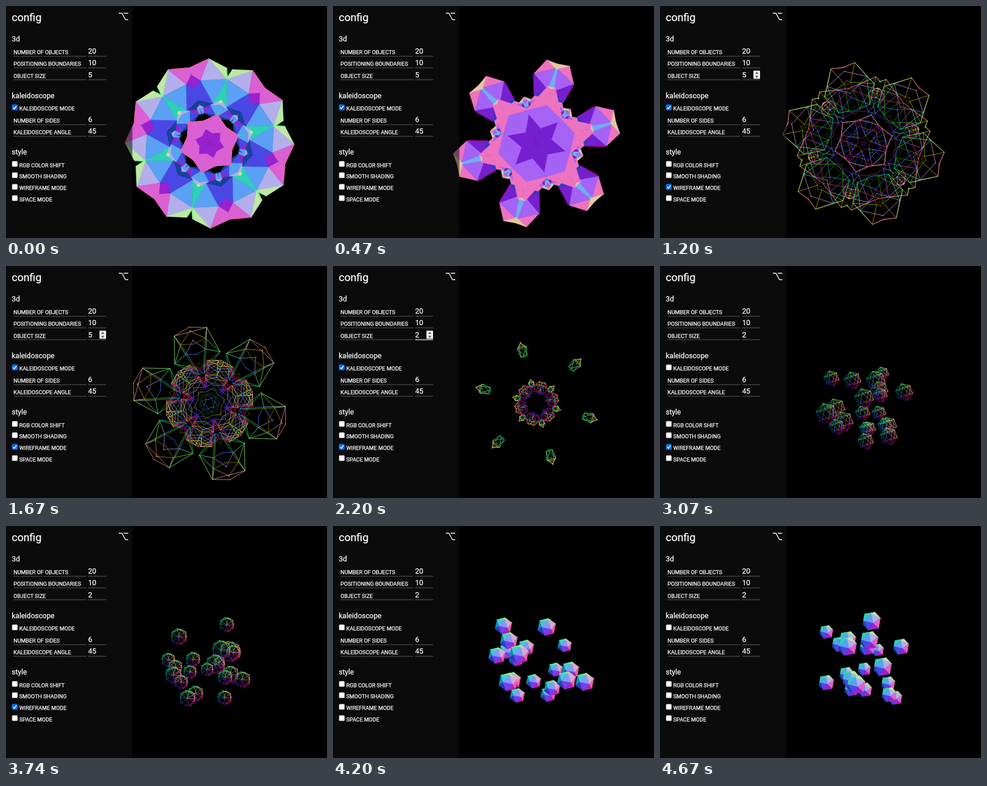
Animation, 555 px wide and 400 px high, one loop 4730 ms. Source, as an HTML page with a canvas:

```html
<!DOCTYPE html>
<html lang="en">
<head>
<meta charset="utf-8">
<title>config</title>
<style>
html, body { margin: 0; width: 100%; height: 100%; overflow: hidden; background: #000; }
canvas, svg { position: absolute; left: 0; top: 0; width: 555px; height: 400px; }
text { font-family: Roboto, Arial, sans-serif; font-size: 9.45px; fill: #fff; stroke: #fff; stroke-width: .25px; }
.title { font-size: 18.6px; }
.head, .value { font-size: 12.5px; }
.line { stroke: #484848; stroke-width: 1.4; }
.line.focus { stroke: #ddd; }
.box { fill: #fff; stroke: #767676; stroke-width: .7; }
.tick { fill: none; stroke: #fff; stroke-width: 1.5; visibility: hidden; }
.on .box { fill: #0b6df0; stroke: #0b6df0; }
.on .tick { visibility: visible; }
</style>
</head>
<body>
<canvas id="stage" width="555" height="400"></canvas>
<svg id="panel" viewBox="0 0 555 400">
  <rect width="218.5" height="400" fill="#141414" fill-opacity=".55"/>
  <text class="title" x="10" y="25.5">config</text>
  <path d="M195 12.5h5.5l6 11h4.8M203.5 12.5h7.8" fill="none" stroke="#fff" stroke-width="1.3"/>
  <text class="head" x="10" y="60.5">3d</text>
  <text class="head" x="10" y="159">kaleidoscope</text>
  <text class="head" x="10" y="256">style</text>
</svg>
<script>
const RAD = Math.PI / 180;
const LOOP = 4730, FRAMES = 71, STEP = 1 / 15;
const CX = 352, CY = 237;
// moments in seconds
const WIRE_ON = .9, HOVER = 1.14, FOCUS = 1.7, LEAVE = 2.6, KALEIDO_OFF = 2.88, WIRE_OFF = 4.2, END = 4.667;

const panel = document.getElementById('panel');
const ctx = document.getElementById('stage').getContext('2d');

// ---- config panel ----
function add(markup) {
  const g = document.createElementNS('http://www.w3.org/2000/svg', 'g');
  g.innerHTML = markup;
  return panel.appendChild(g);
}
function field(label, value, y) {
  return add(`<text x="13" y="${y}">${label}</text><text class="value" x="142" y="${y - 1}">${value}</text>
    <path class="line" d="M13 ${y + 3.6}H139"/><path class="line edge" d="M142 ${y + 3.6}H173"/>`);
}
function checkbox(label, y) {
  return add(`<rect class="box" x="10.5" y="${y - 10}" width="9.5" height="9.5" rx="1.6"/>
    <path class="tick" d="M12.5 ${y - 5}l2 2.2 3.6-4.8"/><text x="23" y="${y}">${label}</text>`);
}
field('NUMBER OF OBJECTS', 20, 83);
field('POSITIONING BOUNDARIES', 10, 103);
const sizeField = field('OBJECT SIZE', 5, 123.5);
const kaleidoBox = checkbox('KALEIDOSCOPE MODE', 180);
field('NUMBER OF SIDES', 6, 201);
field('KALEIDOSCOPE ANGLE', 45, 221);
checkbox('RGB COLOR SHIFT', 277.5);
checkbox('SMOOTH SHADING', 297);
const wireBox = checkbox('WIREFRAME MODE', 317);
checkbox('SPACE MODE', 336.5);
const spinner = add(`<rect x="161.5" y="111.5" width="11.5" height="14" rx="1" fill="#eee"/>
  <path d="M164.5 117l2.8-3.4 2.8 3.4zM164.5 120.5l2.8 3.4 2.8-3.4z" fill="#555"/>`);
const sizeText = sizeField.querySelector('.value');
const sizeEdge = sizeField.querySelector('.edge');

// ---- 3d ----
const turn = (a, b, t) => [a * Math.cos(t) - b * Math.sin(t), a * Math.sin(t) + b * Math.cos(t)];
function rotate([x, y, z], ax, ay, az) {
  [z, x] = turn(z, x, ay);
  [y, z] = turn(y, z, ax);
  [x, y] = turn(x, y, az);
  return [x, y, z];
}
const spin = (v, t) => rotate(v, .86 * t, 1.5 * t, -.75 * t);

// icosahedron: two poles and two rings of five, tilted
const verts = [[0, 0, 1], [0, 0, -1]], edges = [], faces = [];
for (let k = 0; k < 10; k++) {
  const a = (26 + 36 * k) * RAD, up = k % 2 ? -1 : 1;
  verts.push([2 * Math.cos(a), 2 * Math.sin(a), up].map(n => n / Math.sqrt(5)));
}
const near = (i, j) => Math.hypot(...verts[i].map((n, k) => n - verts[j][k])) < 1.1;
for (let i = 0; i < 12; i++) for (let j = i + 1; j < 12; j++) if (near(i, j)) {
  edges.push([i, j]);
  for (let k = j + 1; k < 12; k++) if (near(i, k) && near(j, k)) faces.push([i, j, k]);
}
const pose = t => verts.map(v => spin(rotate(v, 12 * RAD, 8.5 * RAD, 0), t));

function normal(ids, vs) {
  const sum = [0, 1, 2].map(k => ids.reduce((s, i) => s + vs[i][k], 0));
  const len = Math.hypot(...sum);
  return sum.map(n => n / len);
}
const color = (n, mid) => `rgb(${n.map(c => Math.round(mid + 127 * c))})`;

function trace(ids, vs, { x, y, r }) {
  ctx.beginPath();
  for (const i of ids) ctx.lineTo(x + vs[i][0] * r, -y - vs[i][1] * r);
}
function drawObject(vs, obj, wired) {
  for (const ids of wired ? edges : faces) {
    const n = normal(ids, vs);
    if (!wired && n[2] <= 0) continue;
    ctx.fillStyle = ctx.strokeStyle = color(n, wired ? 105 : 128);
    trace(ids, vs, obj);
    if (!wired) {
      ctx.closePath();
      ctx.fill();
    }
    ctx.stroke();
  }
}

// ---- free view: a random cloud turning in perspective ----
let seed = 7;
const random = () => (seed = seed * 16807 % 2147483647) / 2147483647;
const cloud = Array.from({ length: 20 }, () => [0, 0, 0].map(() => random() * 10 - 5));

function drawCloud(t, wired) {
  const vs = pose(t - END);
  const objects = cloud.map(p => {
    const [x, y, z] = spin(p, t - END), r = 294 / (20.7 - z);
    return { x: x * r, y: y * r, r };
  }).sort((a, b) => a.r - b.r);
  ctx.save();
  ctx.translate(CX, CY);
  for (const obj of objects) drawObject(vs, obj, wired);
  ctx.restore();
}

// ---- kaleidoscope: one 30 degree wedge, mirrored round the centre ----
// x, y, radius of the objects crossing the wedge, back to front, at each key time
const keyTimes = [0, .467, 1.2, 2.2];
const paths = [
  [[62, 1, 12], [70, 0, 13], [74, 42, 14], [35, -3, 22]],
  [[60, 22, 20], [60, 22, 24], [62, 28, 50], [16, 14, 18]],
  [[102, 22, 46], [97, 52, 38], [97, 0, 48], [95, -8, 45]],
  [[2, 25, 53], [23, 41, 68], [10, 12, 40], [24, 12, 30]]
];
function along(path, t, scale) {
  const i = t < keyTimes[1] ? 0 : t < keyTimes[2] ? 1 : 2;
  const p = Math.min(1, (t - keyTimes[i]) / (keyTimes[i + 1] - keyTimes[i]));
  const [x, y, r] = path[i].map((n, k) => n + (path[i + 1][k] - n) * p);
  return { x, y, r: r * scale };
}
function drawKaleido(t, wired, size) {
  const vs = pose(t), objects = paths.map(path => along(path, t, size / 5));
  for (let k = 0; k < 6; k++) for (const side of [1, -1]) {
    ctx.save();
    ctx.translate(CX, CY);
    ctx.rotate(-(45 + 60 * k) * RAD);
    ctx.scale(1, side);
    ctx.beginPath();
    ctx.moveTo(-1, 0);
    ctx.arc(0, 0, 300, -30.6 * RAD, .6 * RAD);
    ctx.clip();
    for (const obj of objects) drawObject(vs, obj, wired);
    ctx.restore();
  }
}

// ---- timeline ----
function render(t) {
  const wired = t >= WIRE_ON && t < WIRE_OFF, kaleido = t < KALEIDO_OFF;
  const size = 5 - Math.max(0, Math.min(3, Math.ceil((t - FOCUS) / .2)));
  sizeText.textContent = size;
  sizeEdge.classList.toggle('focus', t >= FOCUS && kaleido);
  spinner.style.display = t >= HOVER && t < LEAVE ? '' : 'none';
  kaleidoBox.classList.toggle('on', kaleido);
  wireBox.classList.toggle('on', wired);
  ctx.clearRect(0, 0, 555, 400);
  ctx.lineJoin = ctx.lineCap = 'round';
  ctx.lineWidth = wired ? .8 : .5;
  if (kaleido) drawKaleido(t, wired, size);
  else drawCloud(t, wired);
}

const start = performance.now();
let last = -1;
function tick() {
  const step = Math.floor((performance.now() - start) % LOOP / LOOP * FRAMES);
  if (step !== last) render((last = step) * STEP);
  requestAnimationFrame(tick);
}
tick();
</script>
</body>
</html>
```
